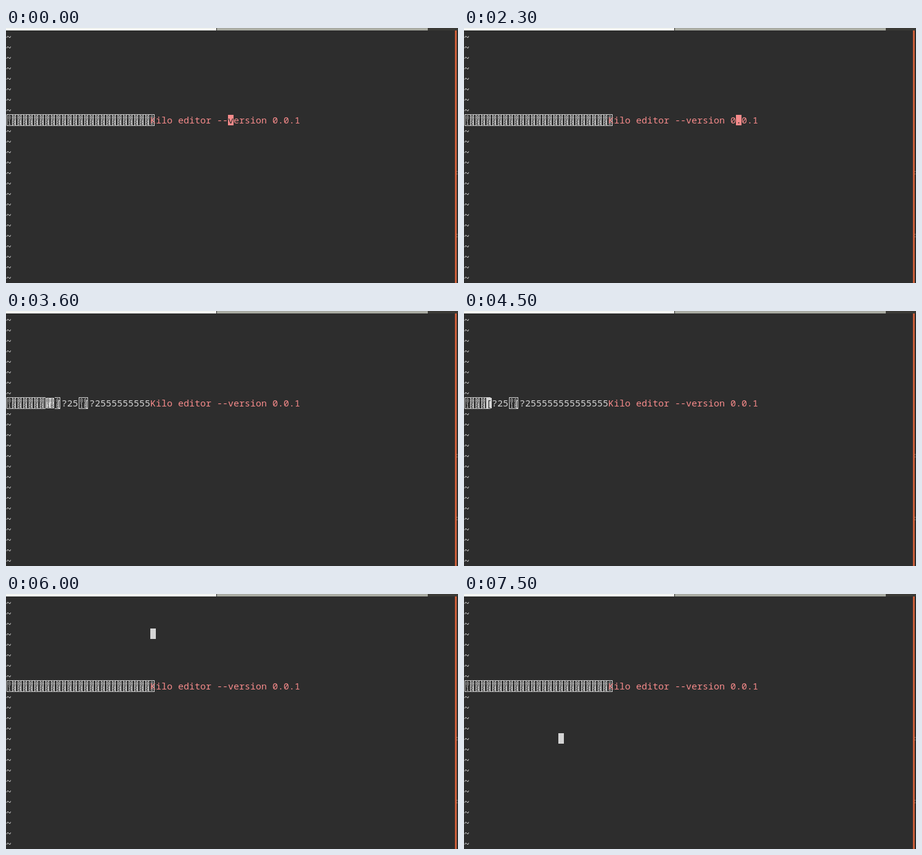
An HTML page for the animation above (8000 ms loop, 733 px wide and 414 px high).

```html
<!DOCTYPE html>
<html lang="en">
<head>
<meta charset="utf-8">
<title>Terminal editor</title>
<style>
  html, body { margin: 0; width: 100%; height: 100%; overflow: hidden; background: #2d2d2d; }
  svg { display: block; }
  text { font: 15px "Noto Sans Mono", "DejaVu Sans Mono", monospace; white-space: pre; }
  .hex text { font: 8px "DejaVu Sans Mono", monospace; text-anchor: middle; }
</style>
</head>
<body>
<svg id="stage" width="733" height="414" viewBox="0 0 733 414">
  <defs>
    <g id="esc" class="hex">
      <rect x="1.5" y="-0.5" width="14" height="18" fill="none" stroke="currentColor"/>
      <g fill="currentColor">
        <text x="5.4" y="7.5">0</text><text x="11.6" y="7.5">0</text>
        <text x="5.4" y="15.5">1</text><text x="11.6" y="15.5">B</text>
      </g>
    </g>
  </defs>
  <rect width="733" height="414" fill="#2d2d2d"/>
  <rect width="341" height="4" fill="#f6f8f3"/>
  <rect x="342" width="342" height="4" fill="#a9aba2"/>
  <rect x="684" width="49" height="4" fill="#3b3a36"/>
  <rect x="728" y="4" width="3" height="410" fill="#cc5e39"/>
  <g fill="#77736d">
    <rect x="731" y="232" width="1" height="2"/><rect x="731" y="236" width="1" height="2"/>
    <rect x="731" y="334" width="1" height="2"/><rect x="731" y="338" width="1" height="2"/>
  </g>
  <g id="screen"></g>
</svg>
<script>
const CW = 9, CH = 17, TOP = 5, BASE = 14, LINE = 8, PAD = 26, LOOP = 8000;
const FG = '#d5d5d5', BG = '#2d2d2d', PINK = '#f78b8b';
const TITLE = 'Kilo editor --version 0.0.1';
const ESC = '\x1b', LEAK = (ESC + '[?25').repeat(2);

// Each run: start time, then one [column, row] per 100 ms.
const along = (row, ...cols) => cols.map(c => [c, row]);
const down = (col, ...rows) => rows.map(r => [col, r]);
const sweep = (from, to, n) =>
  Array.from({ length: n }, (_, i) => [Math.round(from + (to - from) * (i + 1) / n), LINE]);
const runs = [
  [0, along(LINE, 40)],
  [700, along(LINE, 41)],
  [1200, along(LINE, 44, 47, 50, 54, 57, 56)],
  [2200, sweep(56, 26, 9)],
  [3100, along(LINE, 23, 20, 16, 13, 10, 7, 4, 1, 0)],
  [4000, along(LINE, 1)],
  [4500, [...along(LINE, 4, 7, 11, 14, 17, 20, 23, 26), [26, 7]]],
  [5800, down(26, 4, 2, 3)],
  [6500, [...down(26, 7, 11, 14), [25, 14]]],
  [7300, [[22, 14], [18, 14], [17, 13]]]
];
const steps = runs.flatMap(([at, cells]) =>
  cells.map(([col, row], i) => ({ at: at + i * 100, col, row })));

// The leaked escape codes start at the column the cursor just left.
steps.forEach((s, i) => {
  const dir = i ? Math.sign(s.col - steps[i - 1].col) : 1;
  const from = s.row !== LINE ? PAD : s.col ? s.col - dir : 0;
  s.pad = Array.from({ length: PAD }, (_, c) => c < from ? ESC : LEAK[c - from] || '5');
});

const screen = document.getElementById('screen');
function add(tag, attrs, content = '') {
  const el = document.createElementNS('http://www.w3.org/2000/svg', tag);
  for (const k in attrs) el.setAttribute(k, attrs[k]);
  el.textContent = content;
  return screen.appendChild(el);
}
const set = (el, attrs) => { for (const k in attrs) el.setAttribute(k, attrs[k]); };
const yOf = row => TOP + row * CH;

for (let r = 0; r < 24; r++)
  if (r !== LINE) add('text', { x: 0, y: yOf(r) + BASE + 1, fill: FG }, '~');

const boxes = Array.from({ length: PAD }, (_, c) =>
  add('use', { href: '#esc', x: c * CW, y: yOf(LINE), color: FG }));
const padText = add('text', { x: 0, y: yOf(LINE) + BASE, fill: FG });
add('text', { x: PAD * CW, y: yOf(LINE) + BASE, fill: PINK }, TITLE);
const block = add('rect', { height: CH });
const blockText = add('text', { fill: BG });
const blockBox = add('use', { href: '#esc', color: BG });

function show({ col, row, pad }) {
  pad.forEach((ch, c) => set(boxes[c], { visibility: ch === ESC ? 'visible' : 'hidden' }));
  padText.textContent = pad.map(ch => ch === ESC ? ' ' : ch).join('');

  const onTitle = row === LINE && col >= PAD && col < PAD + TITLE.length;
  const ch = row !== LINE ? '' : col < PAD ? pad[col] : TITLE[col - PAD] || '';
  const wide = ch === ESC;
  const x = col * CW, y = yOf(row);
  set(block, { x, y, width: wide ? 15 : CW, fill: onTitle ? PINK : FG });
  set(blockText, { x, y: y + BASE });
  blockText.textContent = wide ? '' : ch;
  set(blockBox, { x, y, visibility: wide ? 'visible' : 'hidden' });
}

let current;
function tick() {
  const t = performance.now() % LOOP;
  const step = steps.findLast(s => s.at <= t);
  if (step !== current) show(current = step);
  requestAnimationFrame(tick);
}
tick();
</script>
</body>
</html>
```
